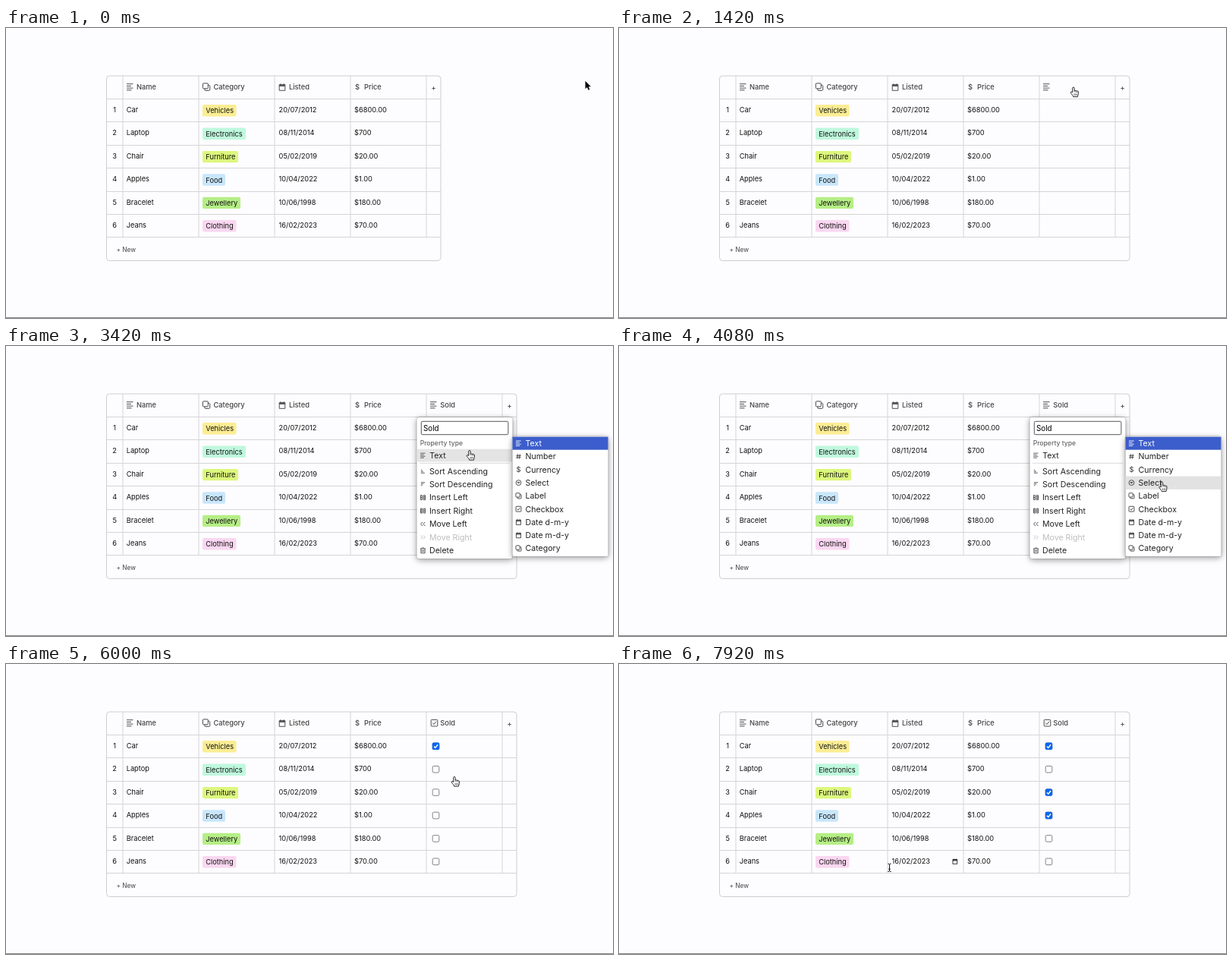
Animation, 800 px wide and 382 px high, one loop 8 s. Source, as an HTML page:

```html
<!DOCTYPE html>
<html lang="en">
<head>
<meta charset="utf-8">
<title>Table with a new checkbox column</title>
<style>
html, body { margin: 0; width: 100%; height: 100%; overflow: hidden; background: #fdfcfe; }
svg { display: block; width: 800px; height: 382px; font-family: Inter, "Liberation Sans", sans-serif; }
text { white-space: pre; }
.head { font-size: 9.3px; font-weight: 500; fill: #444; }
.cell { font-size: 9.25px; fill: #111; }
.item { font-size: 10.6px; fill: #222; }
.panel { fill: #fff; filter: drop-shadow(0 2px 4px rgba(0,0,0,.3)) drop-shadow(0 0 1px rgba(0,0,0,.35)); }
</style>
</head>
<body>
<svg id="stage" viewBox="0 0 800 382"></svg>
<script>
const stage = document.getElementById('stage');
const LINE = '#d5d4d7', STEP = 30.4;

function add(parent, tag, attrs, content) {
  const el = document.createElementNS('http://www.w3.org/2000/svg', tag);
  for (const k in attrs) el.setAttribute(k, attrs[k]);
  if (content !== undefined) el.textContent = content;
  parent.appendChild(el);
  return el;
}
const group = (parent = stage) => add(parent, 'g', {});
const label = (parent, x, y, str, cls, more) => add(parent, 'text', { x, y, class: cls, ...more }, str);
const box = (parent, x, y, width, height, fill, rx = 0) => add(parent, 'rect', { x, y, width, height, fill, rx });
const show = (el, on) => el.setAttribute('visibility', on ? 'inherit' : 'hidden');

// Icon outlines in a 10-unit box around the origin
const ICONS = {
  text: 'M-4.5-4H4M-4.5-1.3H1.5M-4.5 1.4H4M-4.5 4.1H2',
  copy: 'M-3.4-4.6H1.2Q2.2-4.6 2.2-3.6V1Q2.2 2 1.2 2H-3.4Q-4.4 2-4.4 1V-3.6Q-4.4-4.6-3.4-4.6ZM2.2-2.2H3.5Q4.5-2.2 4.5-1.2V3.4Q4.5 4.4 3.5 4.4H-1Q-2-4.4-2 4.4V2'.replace('Q-2-4.4-2 4.4', 'Q-2 4.4-2 3.4'),
  date: 'M-3.8-3.4H3.8V4.3H-3.8ZM-3.8-2.6H3.8M-3.8-1.6H3.8M-2.1-4.8V-3M2.1-4.8V-3',
  check: 'M-3.3-4.3H3.3Q4.3-4.3 4.3-3.3V3.3Q4.3 4.3 3.3 4.3H-3.3Q-4.3 4.3-4.3 3.3V-3.3Q-4.3-4.3-3.3-4.3ZM-2.2 0L-.6 1.8L2.5-2',
  hash: 'M-1.2-4L-2.2 4M2.2-4L1.2 4M-4-1.5H4M-4 1.5H4',
  select: 'M-4.3 0A4.3 4.3 0 1 1 4.3 0A4.3 4.3 0 1 1-4.3 0ZM-1.8-.8H1.8L0 1.4Z',
  asc: 'M-3.5-2H-1.5M-3.5 .6H.5M-3.5 3.2H3',
  desc: 'M-3.5-3.2H3.5M-3.5-.6H.8M-3.5 2H-1.3',
  left: 'M-4-4H-1.5V4H-4ZM1-4H4V4H1ZM-4 0H-1.5M1-1.4H4M1 1.4H4',
  right: 'M-4-4H-1V4H-4ZM1.5-4H4V4H1.5ZM-4-1.4H-1M-4 1.4H-1M1.5 0H4',
  back: 'M-.6-3.5L-4 0L-.6 3.5M4-3.5L.6 0L4 3.5',
  next: 'M-4-3.5L-.6 0L-4 3.5M.6-3.5L4 0L.6 3.5',
  trash: 'M-4.5-3.2H4.5M-1.5-4.6H1.5M-3.5-3.2V4.6H3.5V-3.2M-1.2-1V2.6M1.2-1V2.6'
};
function icon(parent, name, x, y, size = 1, color = '#444') {
  return add(parent, 'path', {
    d: ICONS[name], transform: `translate(${x} ${y}) scale(${size})`, fill: 'none',
    stroke: color, 'stroke-width': .95 / Math.sqrt(size)
  });
}

// Table
box(stage, 0, 381, 800, 1, '#858487');
const grid = add(stage, 'path', { fill: 'none', stroke: LINE });
const frame = add(stage, 'rect', { x: 132.5, y: 63, height: 243.5, rx: 4, fill: 'none', stroke: '#cecdd0' });

icon(stage, 'text', 163.5, 77.7);
icon(stage, 'copy', 264, 77.7, 1.05);
icon(stage, 'date', 364, 78);
label(stage, 460, 81.4, '$', 'head', { 'font-size': 10 });
['Name', 'Category', 'Listed', 'Price'].forEach((s, i) =>
  label(stage, [172, 273.5, 373, 472][i], 81.3, s, 'head'));
const plus = label(stage, 0, 81.6, '+', 'head', { 'text-anchor': 'middle' });
label(stage, 145.5, 295, '+ New', '', { 'font-size': 8.3, fill: '#444' });

const ROWS = [
  ['Car', 'Vehicles', 44.5, '#fbed93', '20/07/2012', '$6800.00'],
  ['Laptop', 'Electronics', 57, '#bff8dd', '08/11/2014', '$700'],
  ['Chair', 'Furniture', 47, '#dcf77c', '05/02/2019', '$20.00'],
  ['Apples', 'Food', 30, '#c8e6fb', '10/04/2022', '$1.00'],
  ['Bracelet', 'Jewellery', 50, '#b5ee86', '10/06/1998', '$180.00'],
  ['Jeans', 'Clothing', 44.5, '#fad7f1', '16/02/2023', '$70.00']
];
const sold = group(), extra = group();
const ticks = [], pickers = [];
ROWS.forEach(([name, tag, width, color, date, price], i) => {
  const y = 110.9 + i * STEP, mid = 108.3 + i * STEP;
  label(stage, 143.2, y, i + 1, 'cell', { 'text-anchor': 'middle' });
  label(stage, 158.7, y, name, 'cell');
  box(stage, 259, y - 9.8, width, 15.4, color, 2.2);
  label(stage, 263.3, y + 1.5, tag, 'cell');
  label(stage, 359.6, y, date, 'cell');
  label(stage, 459, y, price, 'cell');
  pickers.push(icon(stage, 'date', 442.8, mid - .2, .75, '#111'));
  add(sold, 'rect', { x: 562.2, y: mid - 4.3, width: 8.6, height: 8.6, rx: 1.7, fill: '#fff', stroke: '#767676', 'stroke-width': .9 });
  const tick = group(sold);
  box(tick, 561.8, mid - 4.7, 9.4, 9.4, '#0b66ee', 1.8);
  add(tick, 'path', { d: `M564 ${mid + .2}l1.8 1.9 3.3-4.2`, fill: 'none', stroke: '#fff', 'stroke-width': 1.4 });
  ticks.push(tick);
});
const textMark = icon(extra, 'text', 563.5, 77.7);
const checkMark = icon(extra, 'check', 564.5, 77.7);
const title = label(extra, 572.3, 81.3, '', 'head');

// Column menu
const menu = group();
add(menu, 'rect', { x: 541.5, y: 94, width: 126, height: 186, rx: 3, class: 'panel' });
add(menu, 'rect', { x: 547.3, y: 99.3, width: 114.6, height: 17.4, rx: 1.5, fill: '#fff', stroke: '#555' });
const field = label(menu, 550, 111.6, '', '', { 'font-size': 9.8, fill: '#000' });
label(menu, 545.7, 131, 'Property type', '', { 'font-size': 8.6, 'font-weight': 500, fill: '#666' });
const menuHover = box(menu, 541.5, 0, 126, 0, '#e4e4e4');
icon(menu, 'text', 549.5, 144.2, .75);
label(menu, 558.3, 147.9, 'Text', 'item');
box(menu, 545, 153.8, 119, 1, '#d9d9d9');
const ACTIONS = [['asc', 'Sort Ascending'], ['desc', 'Sort Descending'], ['left', 'Insert Left'], ['right', 'Insert Right'],
  ['back', 'Move Left'], ['next', 'Move Right'], ['trash', 'Delete']];
ACTIONS.forEach(([mark, s], i) => {
  const y = 164.8 + i * 17.42, off = s === 'Move Right';
  icon(menu, mark, 549.5, y, .75, off ? '#bbb' : '#333');
  label(menu, 558, y + 3.8, s, 'item', off ? { style: 'fill:#bdbdbd' } : {});
});

const types = group();
const TYPE_TOP = 119.7, TYPE_H = 17.3;
add(types, 'rect', { x: 667.5, y: 119.5, width: 126, height: 157.5, rx: 2, class: 'panel' });
const typeHover = box(types, 667.5, 0, 126, TYPE_H, '#e2e2e2');
box(types, 667.5, TYPE_TOP, 126, 17, '#3c5dcc');
const TYPES = [['text', 'Text'], ['hash', 'Number'], ['', 'Currency'], ['select', 'Select'], ['copy', 'Label'],
  ['check', 'Checkbox'], ['date', 'Date d-m-y'], ['date', 'Date m-d-y'], ['copy', 'Category']];
TYPES.forEach(([mark, s], i) => {
  const y = TYPE_TOP + 8.5 + i * TYPE_H, color = i ? '#333' : '#fff';
  if (mark) icon(types, mark, 675.5, y, .8, color);
  else label(types, 675.5, y + 3.4, '$', 'head', { 'text-anchor': 'middle' });
  label(types, 684.5, y + 3.8, s, 'item', { style: `fill:${i ? '#222' : '#fff'}` });
});

// Pointers, hotspot at the origin
const pointer = group();
const shapes = { arrow: group(pointer), hand: group(pointer), beam: group(pointer) };
add(shapes.arrow, 'path', {
  d: 'M0 0V10.4L2.4 8.2L4 12L5.8 11.2L4.2 7.5H7.4Z', fill: '#000', stroke: '#fff',
  'stroke-width': 1.4, 'paint-order': 'stroke', 'stroke-linejoin': 'round'
});
add(shapes.hand, 'path', {
  d: 'M-1.3 1.2A1.2 1.2 0 0 1 1.1 1.2V4.7A1.05 1.05 0 0 1 3 4.9A1.05 1.05 0 0 1 4.8 5.3A1 1 0 0 1 6.4 6.1V8.8C6.4 10.4 5.4 11 5.4 12.6H-.3C-.3 11.2-2.6 9.2-3.6 7.5C-4.3 6.2-2.8 5.6-2 6.4L-1.3 7.1Z',
  fill: '#fff', stroke: '#111', 'stroke-width': .9, 'stroke-linejoin': 'round'
});
add(shapes.hand, 'path', { d: 'M1.1 4.7V6.6M3 5V6.9M4.8 5.4V7.2M1 8.4V11M2.7 8.4V11M4.3 8.4V11', stroke: '#111', 'stroke-width': .6 });
['#fff', '#111'].forEach((stroke, i) => add(shapes.beam, 'path', {
  d: 'M-2.2-5.2Q0-5.2 0-4V4Q0 5.2-2.2 5.2M2.2-5.2Q0-5.2 0-4M0 4Q0 5.2 2.2 5.2M-1.3 1.8H1.3',
  fill: 'none', stroke, 'stroke-width': i ? 1 : 2.4
}));

// Pointer path: tick (1/12 s), x, y
const PATH = [
  [0, 763.5, 69.8], [3, 752, 60], [6, 690, 50], [9, 622, 52], [11, 580, 57], [13, 562, 74], [14, 562, 75], [17, 599, 78],
  [31, 599, 78], [36, 605, 104], [39, 611, 136], [41, 611, 137.6], [44, 650, 143], [46, 690, 152], [49, 715.6, 179],
  [53, 714, 211], [55, 714, 212], [60, 714, 212], [63, 690, 190], [66, 610, 135], [69, 568, 108], [70, 569, 97],
  [71, 576, 120], [72, 591, 148.5], [73, 606, 160], [75, 575, 165], [77, 567, 167], [79, 567, 197], [80, 567, 198],
  [83, 590, 212], [86, 602, 220], [89, 574, 219], [90, 574, 220], [92, 500, 235], [95, 356.5, 268.3]
];
function pointAt(n) {
  const i = PATH.findIndex(p => p[0] >= n);
  if (i < 0) return PATH[PATH.length - 1].slice(1);
  if (i === 0) return PATH[0].slice(1);
  const [n0, x0, y0] = PATH[i - 1], [n1, x1, y1] = PATH[i];
  const k = (n - n0) / (n1 - n0);
  return [x0 + (x1 - x0) * k, y0 + (y1 - y0) * k];
}

const COLUMN = 14, MENU = 18, TYPES_OPEN = 40, PICK = 55;
const KEYS = [23, 25, 27, 30];
const CHECKED = { 0: 70, 2: 77, 3: 80 };

function pointerKind(x, y, open, wide) {
  if (open && x > 541 && y > 94) return y < 117 ? 'beam' : y < 136 && x < 668 ? 'arrow' : 'hand';
  const right = wide ? 673 : 573;
  if (x < 154 || x > right || y < 63 || y > 276) return 'arrow';
  if (y < 93.5) return 'hand';
  if (x < 554) return 'beam';
  return wide && x < 654 ? 'hand' : 'arrow';
}

function draw(n) {
  const wide = n >= COLUMN, open = n >= MENU && n < PICK, sub = n >= TYPES_OPEN && n < PICK;
  const right = wide ? 673 : 573;
  let d = '';
  for (let i = 0; i < 7; i++) d += `M132.5 ${Math.round(93 + i * STEP) + .5}H${right}`;
  for (let x = 154; x < right; x += x === 154 ? 100 : 100) d += `M${x} 63V276`;
  grid.setAttribute('d', d);
  frame.setAttribute('width', right - 132.5);
  plus.setAttribute('x', right - 9.5);

  const typed = 'Sold'.slice(0, KEYS.filter(k => n >= k).length);
  title.textContent = field.textContent = typed;
  show(extra, wide);
  show(textMark, wide && n < PICK);
  show(checkMark, n >= PICK);
  show(sold, n >= PICK);
  ticks.forEach((el, i) => show(el, n >= PICK && n >= CHECKED[i]));
  show(menu, open);
  show(types, sub);

  const [x, y] = pointAt(n);
  const onTypes = sub && x > 667.5 && y > TYPE_TOP;
  show(menuHover, open && !onTypes && x > 541 && y > 135.5 && y < 152.5);
  menuHover.setAttribute('y', 135.7);
  menuHover.setAttribute('height', 16.8);
  show(typeHover, onTypes);
  typeHover.setAttribute('y', TYPE_TOP + TYPE_H * Math.floor((y - TYPE_TOP) / TYPE_H));
  const row = Math.floor((y - 93.5) / STEP);
  pickers.forEach((el, i) => show(el, i === row && x > 354 && x < 454));

  const kind = pointerKind(x, y, open, wide);
  for (const k in shapes) show(shapes[k], k === kind);
  show(pointer, n < KEYS[0] || n > KEYS[3]);
  pointer.setAttribute('transform', `translate(${x} ${y})`);
}

let start;
function tick(now) {
  if (start === undefined) start = now;
  draw(Math.floor(((now - start) % 8000 + 3.4) * 12 / 1000) % 96);
  requestAnimationFrame(tick);
}
draw(0);
requestAnimationFrame(tick);
</script>
</body>
</html>
```
